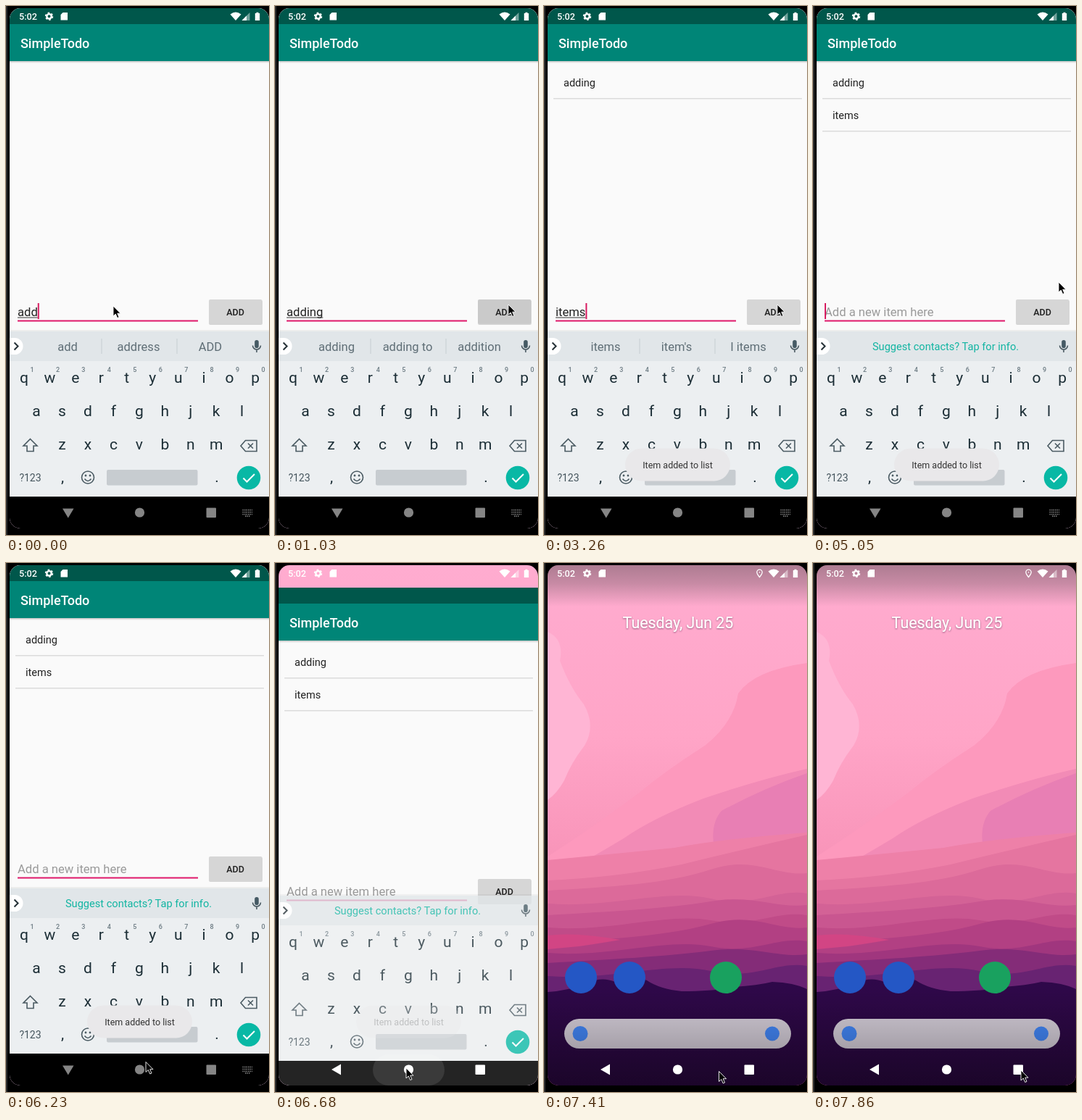
Write an HTML page that moves like this. It is 363 px wide and 730 px high and loops after 8000 ms.

```html
<!DOCTYPE html>
<html lang="en">
<head>
<meta charset="utf-8">
<title>Todo app demo</title>
<style>
html, body { margin: 0; width: 100%; height: 100%; overflow: hidden; background: #000; }
svg { display: block; width: 363px; height: 730px; }
text { font-family: Roboto, sans-serif; white-space: pre; }
.mid { text-anchor: middle; }
.med { font-weight: 500; }
.list { font-size: 14.5px; fill: #212121; }
.input { font-size: 16.6px; }
.sug { font-size: 16.5px; fill: #5f6e76; text-anchor: middle; }
.key { font-size: 21px; fill: #1c2e36; text-anchor: middle; }
.num { font-size: 9px; font-weight: 500; fill: #6b7a82; text-anchor: middle; }
.line { fill: none; stroke: #4b5b63; stroke-width: 1.6; }
</style>
</head>
<body>
<svg viewBox="0 0 363 730">
  <defs>
    <clipPath id="screen"><rect x="5" y="3" width="358" height="718" rx="15"/></clipPath>
    <linearGradient id="sky" x1="0" y1="0" x2="0" y2="600" gradientUnits="userSpaceOnUse">
      <stop offset="0" stop-color="#ffacd0"/><stop offset=".4" stop-color="#ffa5c7"/>
      <stop offset=".7" stop-color="#f893b8"/><stop offset="1" stop-color="#e878a6"/>
    </linearGradient>
    <linearGradient id="ground" x1="0" y1="570" x2="0" y2="721" gradientUnits="userSpaceOnUse">
      <stop offset="0" stop-color="#2f084a"/><stop offset="1" stop-color="#2a0840"/>
    </linearGradient>
    <linearGradient id="topShade" x1="0" y1="0" x2="0" y2="1">
      <stop offset="0" stop-color="#333" stop-opacity=".4"/>
      <stop offset=".45" stop-color="#333" stop-opacity=".27"/>
      <stop offset="1" stop-color="#333" stop-opacity="0"/>
    </linearGradient>
    <linearGradient id="lowShade" x1="0" y1="0" x2="0" y2="1">
      <stop offset="0" stop-color="#000" stop-opacity="0"/>
      <stop offset="1" stop-color="#000" stop-opacity=".35"/>
    </linearGradient>
    <linearGradient id="barShadow" x1="0" y1="0" x2="0" y2="1">
      <stop offset="0" stop-color="#000" stop-opacity=".22"/>
      <stop offset="1" stop-color="#000" stop-opacity="0"/>
    </linearGradient>
    <filter id="soft" x="-20%" y="-40%" width="140%" height="200%">
      <feDropShadow dx="0" dy="1" stdDeviation="1.2" flood-color="#402040" flood-opacity=".6"/>
    </filter>
  </defs>
  <rect width="363" height="730"/>
  <rect width="2" height="730" fill="#2b2b2b"/>
  <g clip-path="url(#screen)">
    <g id="wall">
      <rect width="363" height="730" fill="url(#sky)"/>
      <path fill="#ffb5d4" d="M5 95Q28 105 22 135Q36 172 55 195Q72 225 56 252Q38 275 28 300Q18 318 5 327Z"/>
      <path fill="#fd99bd" d="M363 138Q290 148 268 180Q262 220 222 252Q170 285 130 318Q60 370 5 405V600H363Z"/>
      <path fill="#f28bb6" d="M363 284Q300 298 220 325Q150 352 110 380Q60 410 5 440V600H363Z"/>
      <path fill="#e87fb4" d="M363 290Q300 312 245 342Q229 360 235 395L363 372Z"/>
      <path fill="#ee80a8" d="M363 372Q250 380 180 393Q90 402 5 410V600H363Z"/>
      <path fill="#e575a0" d="M363 375Q280 394 190 416Q100 434 5 438V600H363Z"/>
    </g>
    <g id="launcher">
      <text class="mid" x="185" y="90" font-size="21.4" fill="#fff" filter="url(#soft)">Tuesday, Jun 25</text>
      <g id="dock">
        <circle cx="51" cy="572" r="22" fill="#2457c5"/>
        <circle cx="118" cy="572" r="22" fill="#2457c5"/>
        <circle cx="251" cy="572" r="22" fill="#19a15f"/>
        <rect x="28" y="629" width="313" height="41" rx="20.5" fill="#d3ccd7"/>
        <circle cx="50" cy="649.5" r="10.5" fill="#4285f4"/>
        <circle cx="315" cy="649.5" r="10" fill="#4285f4"/>
      </g>
    </g>
    <g id="shade">
      <rect x="5" y="3" width="358" height="57" fill="url(#topShade)"/>
      <rect x="5" y="590" width="358" height="131" fill="url(#lowShade)"/>
    </g>
    <g id="app">
      <rect x="5" y="3" width="358" height="720" fill="#fafafa"/>
      <rect x="5" y="3" width="358" height="22" fill="#00574b"/>
      <rect x="5" y="25" width="358" height="51" fill="#008577"/>
      <rect x="5" y="76" width="358" height="3" fill="url(#barShadow)"/>
      <text class="med" x="20" y="58" font-size="18" fill="#fff">SimpleTodo</text>
      <g id="row1"><text class="list" x="27" y="111">adding</text><rect x="13" y="127" width="343" height="1.5" fill="#dcdcdc"/></g>
      <g id="row2"><text class="list" x="27" y="156">items</text><rect x="13" y="172" width="343" height="1.5" fill="#dcdcdc"/></g>
      <text id="typed" class="input" x="16" y="427.5"></text>
      <rect id="under" x="16" y="429.5" height="1" fill="#333"/>
      <rect id="caret" y="410" width="2" height="22" fill="#d81b60"/>
      <rect x="16" y="433.5" width="249" height="2" fill="#e0186a"/>
      <rect x="280" y="406" width="74" height="34" rx="2" fill="#000" opacity=".15"/>
      <rect id="button" x="280" y="405" width="73.5" height="33.5" rx="2"/>
      <text class="mid med" x="316.5" y="426.5" font-size="12.5" fill="#1f1f1f">ADD</text>
    </g>
    <rect id="navBg" x="5" width="358" height="60"/>
    <g id="board">
      <rect x="5" y="447" width="358" height="2" fill="#000" opacity=".05"/>
      <rect x="5" y="449" width="358" height="41" fill="#e1e6e9"/>
      <rect x="5" y="490" width="358" height="187" fill="#eceff1"/>
      <path d="M5 458H12A11.5 11.5 0 0 1 12 481H5Z" fill="#fff"/>
      <path d="M11.5 464.5L16.5 469.5L11.5 474.5" fill="none" stroke="#263238" stroke-width="2"/>
      <g id="words">
        <path d="M132 459V480M236 459V480" stroke="#c5cdd1"/>
        <text class="sug" x="85" y="476"></text><text class="sug" x="183" y="476"></text><text class="sug" x="282" y="476"></text>
      </g>
      <text id="tip" class="mid" x="183" y="475" font-size="14.6" fill="#12b5a2">Suggest contacts? Tap for info.</text>
      <rect x="343.2" y="461" width="5.6" height="11" rx="2.8" fill="#455a64"/>
      <path d="M340.5 468.5A5.5 5.5 0 0 0 351.5 468.5M346 474V478" class="line"/>
      <g id="keys"></g>
      <path class="line" d="M33.5 597.5L43 607H38V614.5H29V607H24Z"/>
      <path class="line" d="M324 607L330.5 599.5H346V614.5H330.5ZM334 603.5L341 610.5M341 603.5L334 610.5"/>
      <text class="mid" x="33.5" y="656" font-size="14" fill="#45555d">?123</text>
      <text class="key" x="78" y="657">,</text><text class="key" x="291" y="657">.</text>
      <circle class="line" cx="113" cy="650.5" r="8.5"/>
      <path class="line" d="M108.5 652.5Q113 658.5 117.5 652.5"/>
      <circle cx="110" cy="648" r="1.4" fill="#4b5b63"/><circle cx="116" cy="648" r="1.4" fill="#4b5b63"/>
      <rect x="139" y="640" width="125.5" height="21.5" rx="2" fill="#c7ccd0"/>
      <circle cx="335" cy="651" r="16.3" fill="#08b8a5"/>
      <path d="M327.5 651.5L332.5 656.5L343 646" fill="none" stroke="#fff" stroke-width="2"/>
    </g>
    <g id="toast">
      <rect x="112" y="610.5" width="145" height="45" rx="22.5" fill="#e9e8ea"/>
      <text class="mid" x="184.5" y="638" font-size="12.5" fill="#333">Item added to list</text>
    </g>
    <rect id="ripple" x="135" y="678" width="99" height="43" rx="21.5" fill="#fff"/>
    <g id="nav">
      <path id="down" d="M78 693.5H93.5L85.75 706.5Z"/>
      <path id="back" d="M91 691.5V706.5L78 699Z"/>
      <circle cx="184.5" cy="699" r="6.6"/>
      <rect x="276.5" y="692.5" width="13.5" height="13.5" rx="1"/>
      <path id="boardIcon" fill="none" stroke="#858585" stroke-width="1.5" stroke-dasharray="1.5 1" d="M326.5 695.5H340M326.5 698.5H340M326.5 701.5H340M330 704H337"/>
    </g>
    <g id="status" fill="#fff">
      <text class="med" x="18" y="19" font-size="12.7">5:02</text>
      <g fill="none" stroke="#fff"><circle cx="59.5" cy="14.3" r="3.2" stroke-width="2.4"/><circle cx="59.5" cy="14.3" r="4.9" stroke-width="1.6" stroke-dasharray="2.6 2.53"/></g>
      <path d="M78.5 9H85V19.5H75.5V12Z"/>
      <path d="M309.5 11.5Q317 5.5 324.5 11.5L317 20Z"/>
      <path d="M336.5 9V20H325.5Z" opacity=".45"/><path d="M332 13.5V20H325.5Z"/>
      <path d="M343.8 10H345.5V8.8H348.5V10H350.2V20H343.8Z"/>
      <path id="pin" fill="none" stroke="#fff" stroke-width="1.3" d="M297.5 19.5Q293.8 15 293.8 12.8A3.7 3.7 0 0 1 301.2 12.8Q301.2 15 297.5 19.5ZM297.5 12V13.6"/>
    </g>
  </g>
  <path id="mouse" d="M0 0V14L3.3 11L5.7 16.5L8 15.5L5.7 10.2H10Z" fill="#000" stroke="#fff" stroke-width=".9"/>
</svg>
<script>
const LOOP = 8000, TICKS = 54;
const $ = id => document.getElementById(id);
const set = (id, name, value) => $(id).setAttribute(name, value);
const fade = (id, a) => set(id, 'opacity', a);
const move = (id, x, y) => set(id, 'transform', `translate(${x} ${y})`);

// Keyboard letters
const rows = [['qwertyuiop', 25, 520], ['asdfghjkl', 42, 566], ['zxcvbnm', 77.5, 612]];
$('keys').innerHTML = rows.map(([letters, x0, y], r) => [...letters].map((c, i) => {
  const x = x0 + i * 35.45;
  const num = r ? '' : `<text class="num" x="${x + 11}" y="505">${(i + 1) % 10}</text>`;
  return `<text class="key" x="${x}" y="${y}">${c}</text>${num}`;
}).join('')).join('');

// Dusk bands: left height, right height, colour
const bands = [[452, 428, '#dc6a9a'], [470, 456, '#d36296'], [486, 472, '#c95690'],
  [503, 486, '#c04b88'], [524, 503, '#b24083'], [538, 522, '#a0367e'],
  [552, 540, '#842c78'], [570, 556, '#682372']];
$('wall').insertAdjacentHTML('beforeend', bands.map(([l, r, c], i) => {
  const bend = i % 2 ? 7 : -5;
  return `<path fill="${c}" d="M5 ${l}C90 ${l + bend} 170 ${l - 14 - bend} 230 ${r + bend}S320 ${r - bend} 363 ${r}V610H5Z"/>`;
}).join('') + `
  <path fill="#d24584" d="M5 514Q45 509 105 520Q70 526 48 529L5 533Z"/>
  <path fill="url(#ground)" d="M5 592Q35 590 58 580Q80 570 98 578Q122 567 142 576Q160 588 190 591Q235 591 262 585Q295 583 315 578Q345 579 363 588V730H5Z"/>`);

// Tables of [tick, value...]
const typing = [[0, 'add', 'add', 'address', 'ADD'], [1, 'addi', 'addi', 'adding', 'addition'],
  [2, 'addin', 'addin', 'adding', 'addition'], [3, 'adding', 'adding', 'adding to', 'addition'],
  [9, ''], [14, 'i'], [16, 'it', 'it', "it's", "I'll"], [17, 'ite', 'ite', 'item', 'items'],
  [19, 'item', 'item', 'items', 'itemized'], [22, 'items', 'items', "item's", 'I items'], [33, '']];
const caretOn = [[0, 1], [7, 0], [9, 1], [12, 0], [14, 1], [25, 0], [28, 1], [31, 0], [33, 1], [36, 0], [39, 1], [42, 0]];
const path = [[0, 148, 414], [4, 148, 414], [6, 262, 415], [7, 322, 412], [33, 322, 412], [34, 339, 381],
  [35, 338, 392], [37, 318, 460], [39, 265, 588], [41, 205, 680], [43, 181, 697], [47, 181, 697],
  [49, 215, 702], [51, 268, 701], [53, 287, 700]];
const toastAlpha = [[8, 0], [9, .5], [10, 1], [22, 1], [23, .5], [24, 0], [32, 0], [33, .5], [34, 1], [44, 1], [45, .25], [46, 1], [47, .7], [48, .2], [49, 0]];
const press = [[6, 0], [8, 1], [9, .8], [11, 0], [30, 0], [32, 1], [33, .5], [34, 0]];
const rippleAlpha = [[42, 0], [43, .08], [45, .1], [46, 0]];
const rise = [[46, -12], [47, -5], [48, -1.5], [49, 0]];
const dockAlpha = [[46, .65], [47, .85], [48, 1]];
const shadeAlpha = [[46, 0], [50, 1]];

const last = (table, k) => table.filter(s => s[0] <= k).pop();
function mix(table, k, col = 1) {
  const next = table.findIndex(s => s[0] > k);
  if (next < 0) return table[table.length - 1][col];
  if (!next) return table[0][col];
  const a = table[next - 1], b = table[next];
  return a[col] + (b[col] - a[col]) * (k - a[0]) / (b[0] - a[0]);
}

const slots = $('words').querySelectorAll('text');

function drawInput(k) {
  const [, text, ...words] = last(typing, k);
  const typed = $('typed');
  typed.textContent = text || 'Add a new item here';
  typed.setAttribute('fill', text ? '#212121' : '#9a9a9a');
  const width = text ? typed.getComputedTextLength() : 0;
  set('under', 'width', width);
  set('caret', 'x', 16 + width);
  fade('caret', last(caretOn, k)[1]);
  fade('words', words.length ? 1 : 0);
  fade('tip', words.length ? 0 : 1);
  slots.forEach((s, i) => s.textContent = words[i] || '');
  const shade = Math.round(214 - 24 * mix(press, k));
  set('button', 'fill', `rgb(${shade},${shade},${shade})`);
}

function draw(k) {
  const home = k >= 46, leaving = k === 45, white = k >= 45;
  drawInput(k);
  fade('row1', k >= 9 ? 1 : 0);
  fade('row2', k >= 33 ? 1 : 0);
  fade('app', home ? 0 : 1);
  move('app', 0, leaving ? 31 : 0);
  fade('board', home ? 0 : leaving ? .78 : 1);
  move('board', 0, leaving ? 10 : 0);
  set('navBg', 'y', leaving ? 687 : 677);
  set('navBg', 'fill', leaving ? '#242424' : '#000');
  fade('navBg', home ? 0 : 1);
  fade('ripple', mix(rippleAlpha, k));
  set('nav', 'fill', white ? '#fff' : '#858585');
  fade('down', white ? 0 : 1);
  fade('back', white ? 1 : 0);
  fade('boardIcon', white ? 0 : 1);
  fade('pin', home ? 1 : 0);
  fade('launcher', home ? 1 : 0);
  move('launcher', 0, mix(rise, k));
  fade('dock', mix(dockAlpha, k));
  fade('shade', mix(shadeAlpha, k));
  fade('toast', mix(toastAlpha, k));
  move('mouse', mix(path, k), mix(path, k, 2));
}

const start = performance.now();
let shown = -1;
function tick() {
  const t = (performance.now() - start) % LOOP;
  const k = Math.floor((t + 12) / LOOP * TICKS) % TICKS;
  if (k !== shown) draw(shown = k);
  requestAnimationFrame(tick);
}
tick();
</script>
</body>
</html>
```
